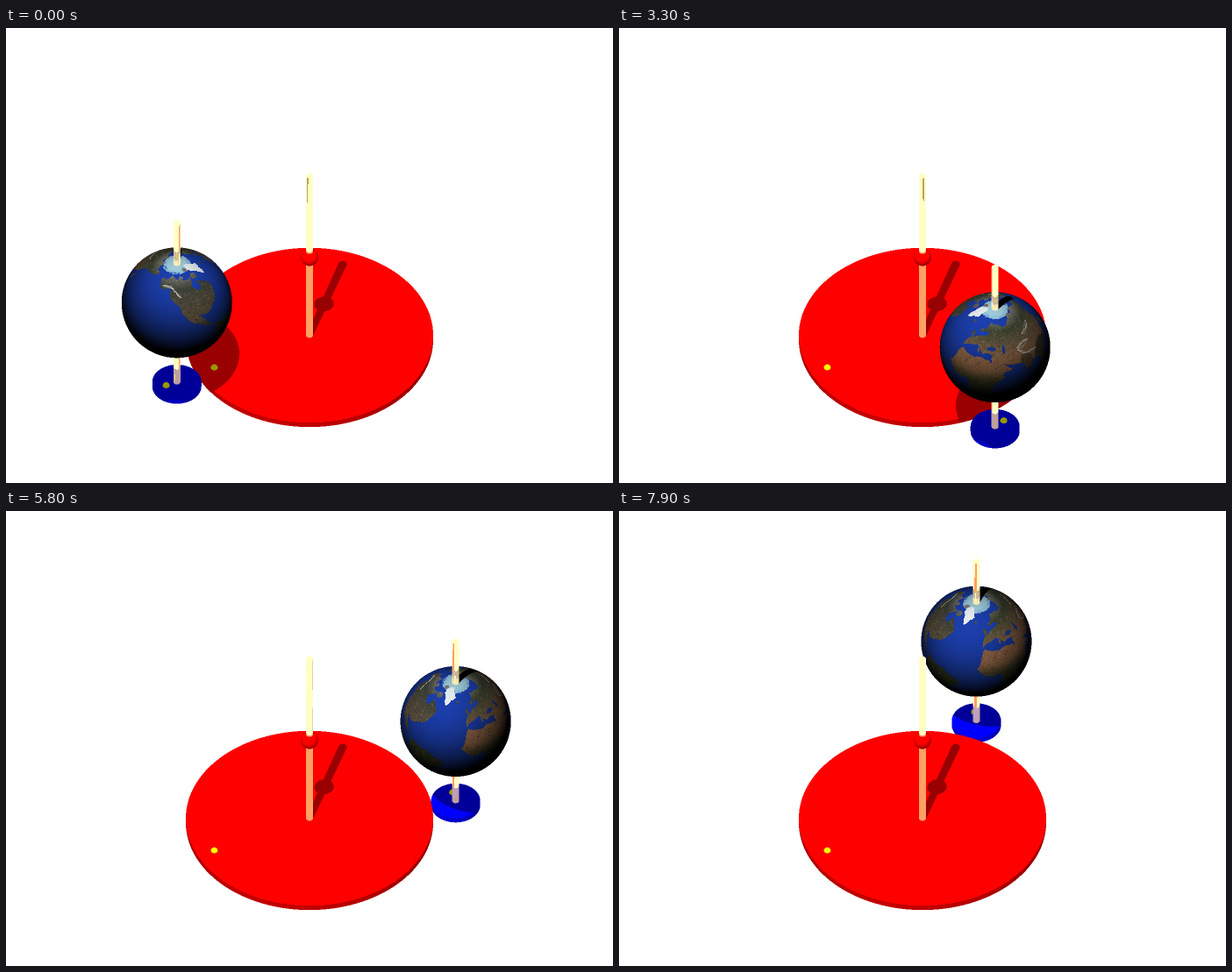
These frames come from a looping animation (692x519 px, 8 s). An HTML page with a canvas:

```html
<!DOCTYPE html>
<html lang="en">
<head>
<meta charset="utf-8">
<title>Rolling globe</title>
<style>
html, body { margin: 0; width: 100%; height: 100%; overflow: hidden; background: #fff; }
canvas { display: block; }
</style>
</head>
<body>
<canvas id="stage" width="692" height="519"></canvas>
<script>
const W = 692, H = 519, CX = 346, CY = 350.5, S = Math.SQRT1_2, DEG = Math.PI / 180;

// ---------- Earth texture: equirectangular, 2 px per degree ----------
const TW = 720, TH = 360;

function earthTexture() {
  const g = Object.assign(document.createElement('canvas'), { width: TW, height: TH }).getContext('2d');
  g.setTransform(2, 0, 0, -2, 360, 180);
  let seed = 7;
  const rnd = () => (seed = seed * 16807 % 2147483647) / 2147483647;
  // Rough line from a to b by midpoint displacement
  const rough = (ax, ay, bx, by, depth) => {
    if (!depth) return g.lineTo(bx, by);
    const k = (rnd() - .5) * .35, mx = (ax + bx) / 2 + (by - ay) * k, my = (ay + by) / 2 - (bx - ax) * k * .6;
    rough(ax, ay, mx, my, depth - 1);
    rough(mx, my, bx, by, depth - 1);
  };
  const trace = p => {
    g.beginPath();
    g.moveTo(p[0], p[1]);
    for (let i = 2; i < p.length; i += 2) rough(p[i - 2], p[i - 1], p[i], p[i + 1], 3);
  };
  const land = (fill, ...p) => {
    g.fillStyle = fill;
    trace([...p, p[0], p[1]]);
    g.fill();
  };
  const blob = (x, y, rx, ry, fill) => {
    g.fillStyle = fill;
    g.beginPath();
    g.ellipse(x, y, rx, ry, 0, 0, 7);
    g.fill();
  };
  // Colours spread evenly from 10 degrees south to 75 north
  const byLatitude = (...colors) => {
    const grad = g.createLinearGradient(0, -10, 0, 75);
    colors.forEach((c, i) => grad.addColorStop(i / (colors.length - 1), c));
    return grad;
  };
  const west = byLatitude('#34421f', '#3a4428', '#705f48', '#575040', '#3e4238', '#7c7a74');
  const east = byLatitude('#3f4a25', '#4c4d2b', '#a0704c', '#9c6e4c', '#6c5b42', '#3d4530', '#77756c');

  // North and South America
  land(west, -166, 67, -110, 69, -83, 69, -93, 58, -79, 52, -76, 62, -56, 52, -81, 27, -97, 28,
    -88, 17, -79, 8, -105, 21, -124, 43, -140, 60, -160, 56);
  land(west, -78, 9, -35, -6, -70, -52, -81, -5);
  // Africa
  land(east, -6, 36, 32, 31, 50, 12, 28, -34, 9, 4, -8, 4, -17, 15);
  // Europe and Asia
  land(east, -9, 37, -8, 43, 8, 54, 28, 59, 17, 61, 6, 60, 26, 71, 104, 77, 178, 68, 145, 59, 127, 37,
    121, 28, 108, 20, 103, 3, 96, 17, 90, 22, 78, 8, 70, 23, 51, 27, 59, 20, 45, 13, 35, 29, 36, 36,
    26, 38, 22, 37, 13, 45, 3, 43);
  // Islands
  blob(-2, 54, 2.5, 4, east);
  blob(-19, 65, 4, 1.4, east);
  blob(138, 37, 2.5, 5, east);
  blob(114, 0, 5, 4, east);
  blob(16, 40, 1.4, 3, east);
  blob(-73, 68, 9, 3.5, west);
  blob(-111, 71, 8, 2, west);
  blob(-80, 79, 12, 3, west);

  // Surface detail, kept on the land
  g.globalCompositeOperation = 'source-atop';
  blob(78, 20, 9, 12, 'rgba(50,50,32,.5)');
  blob(108, 21, 17, 13, 'rgba(42,52,30,.7)');
  for (let i = 0; i < 5200; i++) {
    const tone = rnd() < .6 ? '25,28,18' : '185,165,140';
    blob(rnd() * 360 - 180, rnd() * 130 - 50, .4 + rnd() * 1.3, .3 + rnd() * .8, `rgba(${tone},${.08 + rnd() * .25})`);
  }
  g.lineWidth = 1.2;
  const ridge = (...p) => {
    for (let i = 0; i < 3; i++) {
      g.strokeStyle = `rgba(225,222,220,${.25 + rnd() * .4})`;
      trace(p);
      g.stroke();
    }
  };
  ridge(70, 38, 80, 31, 97, 29);
  ridge(70, 40, 92, 43);
  ridge(88, 50, 115, 56);
  ridge(-117, 50, -134, 60, -154, 60);
  const sea = '#1d3f96';
  blob(34, 43, 6.5, 2.2, sea);
  blob(51, 42, 2.2, 5, sea);

  // Greenland, then polar ice and ocean behind everything
  g.globalCompositeOperation = 'source-over';
  land('#e6edf0', -70, 78, -30, 83, -22, 70, -44, 60, -54, 70);
  g.globalCompositeOperation = 'destination-over';
  for (let i = 0; i < 120; i++) blob(rnd() * 360 - 180, 76 + rnd() * 4, 5 + rnd() * 9, .6 + rnd(), 'rgba(150,200,222,.7)');
  g.fillStyle = '#a3cfdf';
  g.fillRect(-180, 78.5, 360, 11.5);
  g.fillStyle = '#1c3fae';
  g.fillRect(-180, -90, 360, 180);
  return g.getImageData(0, 0, TW, TH).data;
}

// ---------- Scene: x right, y up, z toward the viewer ----------
const LIGHT = [-168, 1397, 510], SKY = [255, 255, 255];
const RED = [255, 0, 0], BLUE = [0, 0, 255], YELLOW = [255, 255, 0], WOOD = [190, 160, 100];
const sphere = (x, y, z, r, col) => ({ round: 1, x, y, z, r, col });
const cylinder = (y, r, len, col) => ({ round: 0, x: 0, y, z: 0, r, len, col });
const pole = () => cylinder(257, 4, 257, WOOD);

const wheel = cylinder(0, 28, 7, BLUE), wheelDot = sphere(0, 0, 0, 4, YELLOW);
const axle = pole(), globe = sphere(0, 128, 0, 63, null);
const scene = [
  cylinder(0, 141, 7, RED), sphere(0, 126, 0, 10, RED), pole(), sphere(-108.5, 0, 52.5, 4, YELLOW),
  wheel, globe, axle, wheelDot];
scene.forEach((s, i) => s.id = i + 1);
const texture = earthTexture();
let facing = 0, dist = 0, onTop = false, key = 0;

// Nearest solid along a ray; leaves its distance in dist.
function cast(o, d, skip) {
  let best = 1e9, hit = null;
  for (const s of scene) {
    if (s === skip) continue;
    const x = o[0] - s.x, y = o[1] - s.y, z = o[2] - s.z, ry = s.round * y, rdy = s.round * d[1];
    const a = d[0] * d[0] + d[2] * d[2] + rdy * rdy;
    const b = x * d[0] + z * d[2] + ry * rdy;
    const D = b * b - a * (x * x + z * z + ry * ry - s.r * s.r);
    if (D < 0) continue;
    const root = Math.sqrt(D);
    let t = (-b - root) / a, top = false;
    if (!s.round) {
      const lid = -y / d[1];
      if (d[1] < 0 && lid > t) { t = lid; top = true; }
      const h = y + t * d[1];
      if (t > (-b + root) / a || h > 1e-6 || h < -s.len) continue;
    }
    if (t > 1e-3 && t < best) { best = t; hit = s; onTop = top; }
  }
  dist = best;
  return hit;
}

function shade(o, d, skip, depth) {
  const s = cast(o, d, skip);
  if (!s) { if (!depth) key = 0; return SKY; }
  const p = o.map((v, i) => v + dist * d[i]);
  const n = onTop ? [0, 1, 0] : [(p[0] - s.x) / s.r, s.round * (p[1] - s.y) / s.r, (p[2] - s.z) / s.r];
  if (s.col === WOOD) {
    if (!depth) key = s.id;
    const k = 2 * (d[0] * n[0] + d[1] * n[1] + d[2] * n[2]);
    const mirror = depth ? SKY : shade(p, d.map((v, i) => v - k * n[i]), s, 1);
    return WOOD.map((v, i) => Math.min(255, v + .38 * mirror[i]));
  }
  const l = LIGHT.map((v, i) => v - p[i]), len = Math.hypot(l[0], l[1], l[2]);
  let lit = (l[0] * n[0] + l[1] * n[1] + l[2] * n[2]) / len;
  if (lit < 0 || cast(p, l.map(v => v / len), s)) lit = 0;
  if (!depth) key = s.id + (lit > 0 ? 16 : 0);
  if (s !== globe) return s.col.map(v => v * Math.min(1, .6 + .6 * lit));
  const lon = facing + Math.atan2(n[0], n[2]) / DEG + 180;
  const lat = Math.asin(Math.max(-1, Math.min(1, n[1]))) / DEG;
  const u = Math.floor((lon % 360 + 360) % 360 * 2) % TW, v = Math.min(TH - 1, Math.floor((90 - lat) * 2));
  const i = (v * TW + u) * 4;
  return SKY.map((_, c) => texture[i + c] * lit);
}

// ---------- Rendering ----------
const ctx = document.getElementById('stage').getContext('2d');
const image = ctx.createImageData(W, H), keys = new Uint8Array(W * H);
const VIEW = [0, -S, -S], X0 = 128, X1 = 584, Y0 = 52, Y1 = 498;

function sample(px, py) {
  const v = py - CY;
  return shade([px - CX, (800 - v) * S, (800 + v) * S], VIEW, null, 0);
}

function eachPixel(draw) {
  for (let y = Y0; y < Y1; y++) for (let x = X0; x < X1; x++) draw(x, y, y * W + x);
}

function render(t) {
  const orbit = (-63.5 + 28.125 * t) * DEG, spin = (-64 + 168.75 * t) * DEG;
  const x = 169 * Math.sin(orbit), z = 169 * Math.cos(orbit);
  for (const s of [wheel, axle, globe]) { s.x = x; s.z = z; }
  wheelDot.x = x + 13.5 * Math.sin(spin);
  wheelDot.z = z + 13.5 * Math.cos(spin);
  facing = -124 - 168.75 * t;

  image.data.fill(255);
  eachPixel((x, y, i) => {
    const c = sample(x + .5, y + .5);
    keys[i] = key;
    for (let k = 0; k < 3; k++) image.data[i * 4 + k] = c[k];
  });
  // Smooth the outlines with four samples per pixel
  eachPixel((x, y, i) => {
    const k = keys[i];
    if (k === keys[i - 1] && k === keys[i + 1] && k === keys[i - W] && k === keys[i + W]) return;
    const sum = [0, 0, 0];
    for (let j = 0; j < 4; j++) {
      const c = sample(x + .25 + .5 * (j & 1), y + .25 + .5 * (j >> 1));
      for (let m = 0; m < 3; m++) sum[m] += c[m] / 4;
    }
    for (let m = 0; m < 3; m++) image.data[i * 4 + m] = sum[m];
  });
  ctx.putImageData(image, 0, 0);
}

// The motion advances in steps of a tenth of a second
let shown = -1;
function tick() {
  const step = Math.floor(performance.now() % 8000 / 100);
  if (step !== shown) render((shown = step) / 10);
  requestAnimationFrame(tick);
}
tick();
</script>
</body>
</html>
```
